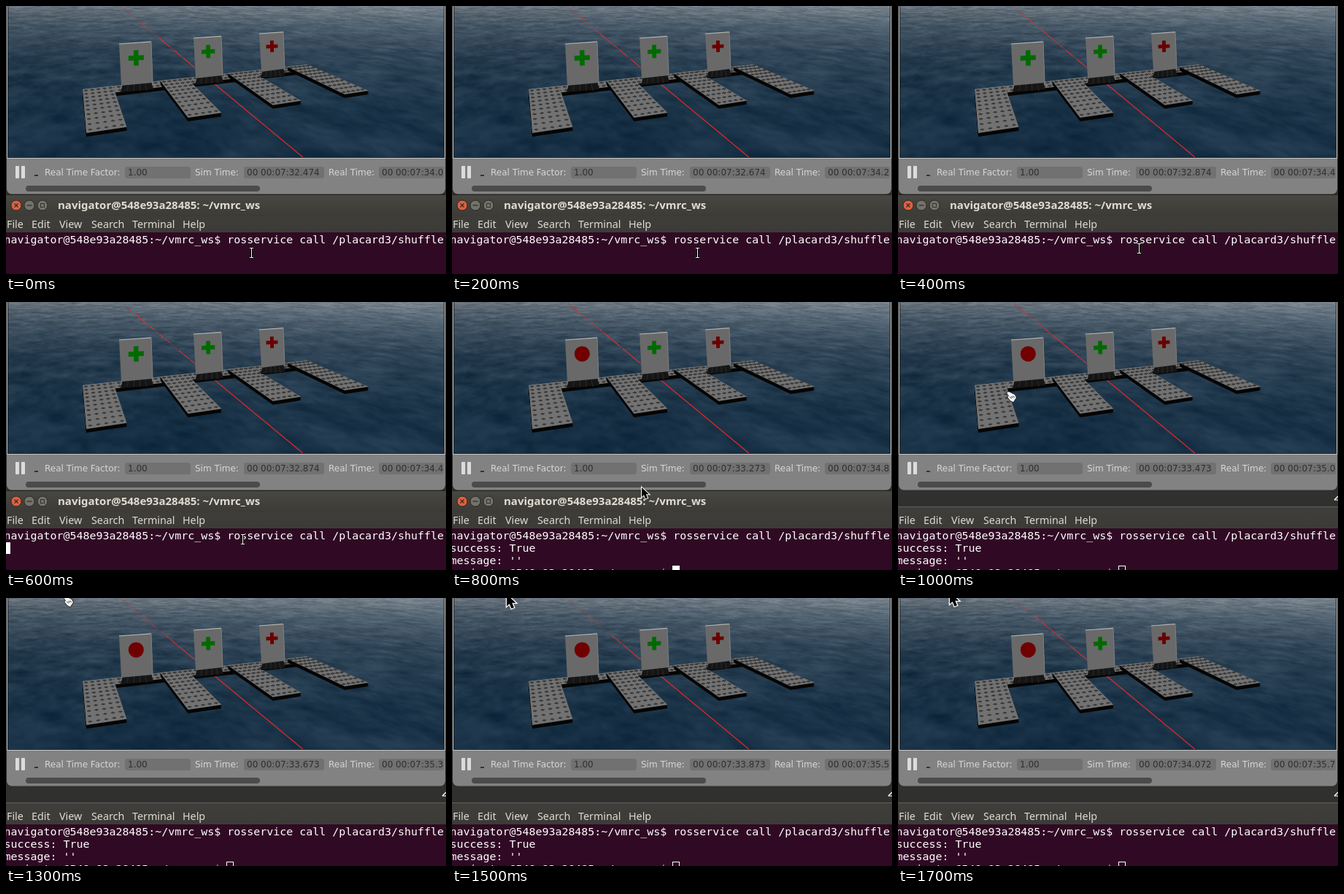
Write an HTML page with a canvas that moves like this. It is 603 px wide and 367 px high and loops after 1.8 s.

```html
<!DOCTYPE html>
<html lang="en">
<head>
<meta charset="utf-8">
<title>Dock placards</title>
<style>
html, body { margin: 0; width: 100%; height: 100%; overflow: hidden; background: #300a24; }
canvas { display: block; }
</style>
</head>
<body>
<canvas id="stage" width="603" height="367"></canvas>
<script>
const ctx = document.getElementById('stage').getContext('2d');
const LOOP = 1800, STEP = 100;
const ENTER = 500, REPLY = 700, BLUR = 900, RAISE = 1000, RELEASE = 1500;
const SEA_W = 598, SEA_H = 207;
const SANS = '12px "DejaVu Sans", sans-serif';
const UI = '"Noto Sans", sans-serif';
const MONO = '14.95px "DejaVu Sans Mono", monospace';
const HOST = 'navigator@548e93a28485:';
const PROMPT = HOST + '~/vmrc_ws$ ';

// ---- helpers ----
const mix = (a, b, k) => a + (b - a) * k;

function poly(points, fill, stroke, width = 1) {
  ctx.beginPath();
  points.forEach(([x, y]) => ctx.lineTo(x, y));
  ctx.closePath();
  if (stroke) { ctx.strokeStyle = stroke; ctx.lineWidth = width; ctx.stroke(); }
  ctx.fillStyle = fill;
  ctx.fill();
}

function line(x1, y1, x2, y2, color, width = 1) {
  ctx.beginPath();
  ctx.moveTo(x1, y1);
  ctx.lineTo(x2, y2);
  ctx.strokeStyle = color;
  ctx.lineWidth = width;
  ctx.stroke();
}

function box(x, y, w, h, color, radius = 0) {
  ctx.beginPath();
  ctx.roundRect(x, y, w, h, radius);
  ctx.fillStyle = color;
  ctx.fill();
}

function outline(x, y, w, h, color) {
  ctx.strokeStyle = color;
  ctx.lineWidth = 1;
  ctx.strokeRect(x + 0.5, y + 0.5, w - 1, h - 1);
}

function disc(x, y, r, fill, stroke) {
  ctx.beginPath();
  ctx.arc(x, y, r, 0, 7);
  ctx.fillStyle = fill;
  ctx.fill();
  if (stroke) { ctx.strokeStyle = stroke; ctx.lineWidth = 1; ctx.stroke(); }
}

function text(str, x, y, font, color) {
  ctx.font = font;
  ctx.fillStyle = color;
  ctx.fillText(str, x, y);
}

function verticalFill(y, h, top, bottom) {
  const g = ctx.createLinearGradient(0, y, 0, y + h);
  g.addColorStop(0, top);
  g.addColorStop(1, bottom);
  ctx.fillStyle = g;
  ctx.fillRect(0, y, 603, h);
}

// ---- sea: perspective value noise, brighter towards the horizon ----
let seed = 77;
const lattice = Float32Array.from({ length: 65536 }, () => {
  seed = (Math.imul(seed, 1664525) + 1013904223) >>> 0;
  return seed / 2147483648 - 1;
});

function noise(x, y) {
  const ix = Math.floor(x), iy = Math.floor(y);
  const ease = f => f * f * (3 - 2 * f);
  const fx = ease(x - ix), fy = ease(y - iy);
  const at = (a, b) => lattice[(a & 255) | (b & 255) << 8];
  return mix(mix(at(ix, iy), at(ix + 1, iy), fx),
             mix(at(ix, iy + 1), at(ix + 1, iy + 1), fx), fy);
}

const seaLayer = document.createElement('canvas');
seaLayer.width = SEA_W;
seaLayer.height = SEA_H;
const seaCtx = seaLayer.getContext('2d');
const seaImage = seaCtx.createImageData(SEA_W, SEA_H);

function renderSea(time) {
  const px = seaImage.data;
  let p = 0;
  for (let y = 0; y < SEA_H; y++) {
    const glow = Math.exp(-y / 52), depth = 1 / (y + 60);
    const v = 3000 * depth + time * 0.0004;
    const strength = 9 + 5 * glow;
    const slope = 22 * Math.exp(-y / 110);
    for (let x = 0; x < SEA_W; x++) {
      const u = (x - 300) * 5 * depth + v * 0.25;
      const wave = noise(u, v)
        + 0.6 * noise(u * 2.7 + 40, v * 2.1 + time * 0.0006)
        + 0.35 * noise(u * 6 + 90, v * 4);
      const light = wave * strength + (x / SEA_W - 0.45) * slope;
      px[p++] = 22 + 88 * glow + light;
      px[p++] = 47 + 74 * glow + light;
      px[p++] = 68 + 63 * glow + light;
      px[p++] = 255;
    }
  }
  seaCtx.putImageData(seaImage, 0, 0);
}

function drawAxis(time) {
  const xAt = y => 157 + y * 1.207;
  for (let y = 0; y < 84; y += 2) {
    const shown = noise(y * 0.42 + 9, time * 0.0035) + y / 70;
    const alpha = Math.min(0.95, Math.max(0.2, shown));
    line(xAt(y), y, xAt(y + 2), y + 2, `rgba(222,48,44,${alpha})`, 1.2);
  }
  line(xAt(84), 84, xAt(207), 207, '#dc282a', 1.3);
}

// ---- dock: a plane of floating cubes seen in perspective ----
function project(u, v) {
  const w = 1 + 0.2503 * u - 0.2585 * v;
  return [(105 + 411.4 * u - 23.4 * v) / w, (114 - 14 * u + 15 * v) / w];
}

function deck(u0, u1, v0, v1, cols, rows) {
  const quad = [project(u0, v0), project(u1, v0), project(u1, v1), project(u0, v1)];
  for (let drop = 5; drop > 0; drop--) {
    poly(quad.map(([x, y]) => [x, y + drop]), '#050505');
  }
  poly(quad, '#727272');
  for (let r = 0; r < rows; r++) {
    for (let c = 0; c < cols; c++) {
      const [x, y] = project(mix(u0, u1, (c + 0.5) / cols), mix(v0, v1, (r + 0.5) / rows));
      line(x - 2.6, y + 0.3, x + 2.6, y - 0.3, '#2c2c2c', 1.3);
      line(x - 0.7, y - 1.5, x + 0.7, y + 1.5, '#383838', 1.1);
    }
  }
}

function drawDock() {
  deck(0, 1, 0, 0.2, 42, 2);
  for (let i = 3; i >= 0; i--) {
    const u = i * 8 / 27;
    deck(u, u + 1 / 9, 0, 1, 5, 10);
  }
}

function plus(x, y, r, color) {
  const w = r * 0.62;
  ctx.save();
  ctx.transform(1, -0.05, 0.02, 1, x, y);
  ctx.fillStyle = color;
  ctx.fillRect(-r, -w / 2, 2 * r, w);
  ctx.fillRect(-w / 2, -r, w, 2 * r);
  ctx.restore();
}

function placard(x, y, w, h, symbol, color) {
  const foot = y + h;
  poly([[x + 5, foot + 2], [x + w, foot - 1], [x + w + 3, foot + 9], [x + 2, foot + 13]], '#151515');
  for (let k = 0.2; k < 0.9; k += 0.2) {
    line(x + 5 + (w - 5) * k, foot + 2, x + 2 + (w + 1) * k, foot + 11, '#2b2b2b');
  }
  const right = y - 0.07 * w;
  poly([[x, y], [x + w, right], [x + w + 2, foot], [x + 3, foot + 4]], '#696969');
  line(x, y, x + w, right, '#b5b5b5', 1.2);
  line(x + w, right, x + w + 2, foot, '#808080');
  symbol(x + w * 0.53, y + h * 0.36, w * 0.24, color);
}

// ---- simulator window ----
function drawToolbar(time) {
  const stalled = time >= 600 && time < REPLY;
  const tick = Math.floor(time / 200) - stalled;
  const label = (s, x) => text(s, x, 232, SANS, '#d6d6d6');
  const field = (s, x, w) => {
    box(x, 220, w, 16, '#717171', 3);
    text(s, x + 4, 232, SANS, '#303030');
  };
  box(13, 219, 5, 17, '#dcdcdc', 1);
  box(21, 219, 5, 17, '#dcdcdc', 1);
  box(39, 231, 5, 2, '#353535');
  label('Real Time Factor:', 53);
  field('1.00', 163, 90);
  label('Sim Time:', 259);
  field('00 00:07:' + (32.4744 + 0.19976 * tick).toFixed(3), 326, 110);
  label('Real Time:', 442);
  field('00 00:07:' + (33.97 + 0.215 * tick).toFixed(1), 511, 89);
  box(27, 246, 321, 8, '#4b4b4b', 4);
}

function drawSimulator(time) {
  ctx.fillStyle = '#30302e';
  ctx.fillRect(0, 0, 603, 258);
  box(1, -10, 601, 267.5, '#828282', 7);
  ctx.drawImage(seaLayer, 3, 0);
  drawAxis(time);
  drawDock();
  placard(155, 52, 44, 53, ...(time < REPLY ? [plus, '#006a00'] : [disc, '#700000']));
  placard(257, 44, 38, 51, plus, '#006a00');
  placard(347, 38, 33, 48, plus, '#6a0000');
  outline(2, -2, 599, 210, '#282828');
  outline(1, -2, 601, 211, '#c4c4c4');
  drawToolbar(time);
}

// ---- terminal window ----
function drawTitle(focused) {
  verticalFill(258, 30, '#484741', '#3c3b37');
  line(0, 258.5, 603, 258.5, '#24231f');
  const ink = focused ? '#dfdbd2' : '#807d78';
  const glyph = focused ? '#33322e' : '#77746e';
  const button = (x, color) => disc(x, 273, 7, focused ? color : '#45443f', '#292824');
  button(14, '#e2603f');
  button(32, '#74736b');
  button(50, '#74736b');
  line(11.5, 270.5, 16.5, 275.5, glyph, 1.4);
  line(16.5, 270.5, 11.5, 275.5, glyph, 1.4);
  line(28.5, 273, 35.5, 273, glyph, 1.4);
  outline(47, 270, 6, 6, glyph);
  text(HOST + ' ~/vmrc_ws', 71, 278, 'bold 15px ' + UI, ink);
}

function drawCoveredTitle() {
  ctx.fillStyle = '#30302f';
  ctx.fillRect(0, 258, 603, 23);
  line(0, 280.5, 603, 280.5, '#62615d');
  line(598, 271, 603, 266, '#eeeeee', 1.6);
  line(598, 271, 603, 271, '#eeeeee', 1.2);
}

function drawMenu() {
  const starts = { File: 1, Edit: 35, View: 73, Search: 117, Terminal: 173, Help: 242 };
  for (const name in starts) text(name, starts[name], 304, '500 14.3px ' + UI, '#dfdbd2');
}

function drawTerminal(time) {
  verticalFill(281, 29, '#3f3e3a', '#3c3b37');
  if (time >= RAISE) drawCoveredTitle();
  else drawTitle(time < BLUR);
  drawMenu();
  ctx.fillStyle = '#300a24';
  ctx.fillRect(0, 310, 603, 57);
  const row = (s, n) => text(s, -2.5, 325 + 17 * n, MONO, '#ffffff');
  row(PROMPT + 'rosservice call /placard3/shuffle', 0);
  if (time >= REPLY) {
    ['success: True', "message: ''", PROMPT].forEach((s, i) => row(s, i + 1));
    if (time < BLUR) box(302, 361, 10, 17, '#ffffff');
    else outline(302, 361, 10, 18, '#ffffff');
  } else if (time >= ENTER) {
    box(0, 329, 6, 16, '#ffffff');
  }
}

// ---- pointer ----
const PATH = [
  [200, 337, 338], [600, 325, 325], [BLUR, 227, 218],
  [RAISE, 149, 123], [1300, 79, -2], [1700, 71, -8]
];

function pointerAt(time) {
  const i = Math.max(1, PATH.findIndex(p => p[0] >= time));
  const [t0, x0, y0] = PATH[i - 1], [t1, x1, y1] = PATH[i];
  const k = Math.max(0, (time - t0) / (t1 - t0));
  return [Math.round(mix(x0, x1, k)), Math.round(mix(y0, y1, k))];
}

function drawBeam() {
  for (const [color, width] of [['#000000', 3], ['#ffffff', 1]]) {
    line(-0.5, -6, -0.5, 6, color, width);
    line(-3, -6.5, 2, -6.5, color, width);
    line(-3, 6.5, 2, 6.5, color, width);
  }
}

function drawArrow(scale) {
  ctx.scale(scale, scale);
  poly([[0, 0], [0, 13], [3, 10.3], [5.2, 15.5], [8, 14.3], [5.8, 9.3], [10, 9.3]],
       '#000000', '#ffffff', 2);
}

function drawHand() {
  poly([[0, 1], [3, 0], [11, 4], [13, 8], [9, 14], [5, 12], [1, 7], [3, 6]],
       '#f4f4f4', '#202020', 1.5);
  for (let i = 0; i < 3; i++) line(4 + i * 2, 7 - i * 0.7, 7 + i * 2, 9 - i * 0.7, '#555555');
}

function drawPointer(time) {
  ctx.save();
  ctx.translate(...pointerAt(time));
  if (time < REPLY) drawBeam();
  else if (time < RAISE) drawArrow(1);
  else if (time < RELEASE) drawHand();
  else drawArrow(1.25);
  ctx.restore();
}

let shown = -1;
function frame(now) {
  const time = Math.floor(now % LOOP / STEP) * STEP;
  if (time !== shown) {
    shown = time;
    renderSea(time);
    drawSimulator(time);
    drawTerminal(time);
    drawPointer(time);
  }
  requestAnimationFrame(frame);
}
frame(0);
</script>
</body>
</html>
```
